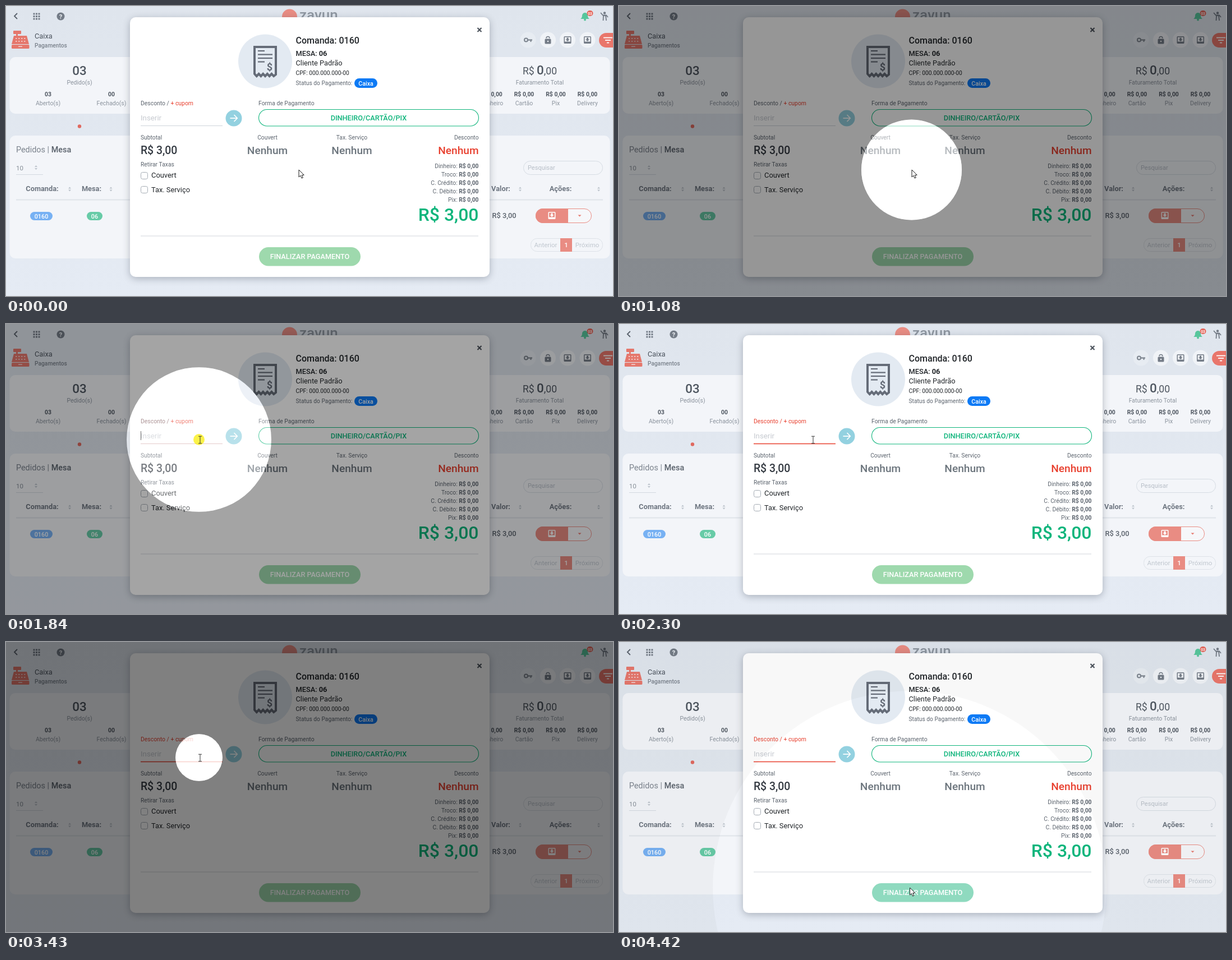
Animation, 1082 px wide and 517 px high, one loop 4480 ms. Source, as an HTML page with a canvas:

```html
<!DOCTYPE html>
<html lang="pt-BR">
<head>
<meta charset="utf-8">
<title>Pagamento</title>
<style>
html, body { margin: 0; width: 100%; height: 100%; overflow: hidden; background: #e2e8f0; }
canvas { display: block; width: 1082px; height: 517px; }
</style>
</head>
<body>
<canvas id="stage"></canvas>
<script>
const W = 1082, H = 517, LOOP = 4480;
const canvas = document.getElementById('stage');
const ratio = window.devicePixelRatio || 1;
canvas.width = W * ratio;
canvas.height = H * ratio;
const ctx = canvas.getContext('2d');
ctx.scale(ratio, ratio);

const INK = '#212529', GRAY = '#5c646e', MUTED = '#6c757d', RED = '#e8402f', GREEN = '#0fb57c';
const PINK = '#e98c83', SOFT = '#8b939d', DARK = '#4f5761';
const clamp = v => Math.max(0, Math.min(1, v));
const span = (t, a, b) => clamp((t - a) / (b - a));
const ease = p => p * p * (3 - 2 * p);
const mix = (a, b, p) => a + (b - a) * p;
const blend = (a, b, p) => `rgb(${a.map((v, i) => Math.round(mix(v, b[i], p))).join(',')})`;

function text(s, x, y, size, color, weight = 400, align = 'left') {
  ctx.font = `${weight} ${size}px Roboto, sans-serif`;
  ctx.textAlign = align;
  ctx.fillStyle = color;
  ctx.fillText(s, x, y);
  return ctx.measureText(s).width;
}
const mid = (s, x, y, size, color, weight) => text(s, x, y, size, color, weight, 'center');
const right = (s, x, y, size, color, weight) => text(s, x, y, size, color, weight, 'right');

// Runs of [string, size, color, weight] set one after another.
function runs(list, x, y) {
  for (const [s, size, color, weight] of list) x += text(s, x, y, size, color, weight);
}

function box(x, y, w, h, r, fill, stroke, lw = 1) {
  ctx.beginPath();
  ctx.roundRect(x, y, w, h, r);
  if (fill) { ctx.fillStyle = fill; ctx.fill(); }
  if (stroke) { ctx.strokeStyle = stroke; ctx.lineWidth = lw; ctx.stroke(); }
}

function disc(x, y, r, fill) {
  ctx.beginPath();
  ctx.arc(x, y, r, 0, Math.PI * 2);
  ctx.fillStyle = fill;
  ctx.fill();
}

function trace(points) {
  ctx.beginPath();
  for (let i = 0; i < points.length; i += 2) ctx.lineTo(points[i], points[i + 1]);
}

function line(points, color, lw = 1) {
  trace(points);
  ctx.strokeStyle = color;
  ctx.lineWidth = lw;
  ctx.stroke();
}

function shape(points, color) {
  trace(points);
  ctx.closePath();
  ctx.fillStyle = color;
  ctx.fill();
}

function sorter(x, y) {
  shape([x - 2.5, y - 1, x, y - 4, x + 2.5, y - 1], '#bcc3cb');
  shape([x - 2.5, y + 1, x, y + 4, x + 2.5, y + 1], '#bcc3cb');
}

function inbox(x, y, color, paper) {
  box(x - 6.5, y - 6.5, 13, 13, 1.5, color);
  box(x - 5, y - 5, 10, 8, 0, paper);
  shape([x - 1.5, y - 4, x + 1.5, y - 4, x + 1.5, y - 1, x + 3.5, y - 1, x, y + 2.5, x - 3.5, y - 1, x - 1.5, y - 1], color);
}

function header() {
  line([20, 13, 15, 18, 20, 23], '#59616c', 1.8);
  for (let i = 0; i < 9; i++) box(48.5 + (i % 3) * 4.5, 12.5 + Math.floor(i / 3) * 4.5, 3, 3, 0.3, '#747c87');
  disc(97.5, 18.5, 7, '#747c87');
  mid('?', 97.5, 22.5, 11, '#edf1f5', 700);

  disc(505.5, 19, 13.5, PINK);
  text('zavun', 523, 25, 26, '#8f97a1', 500);

  ctx.beginPath();
  ctx.moveTo(1024, 23);
  ctx.quadraticCurveTo(1027, 21, 1027, 17);
  ctx.arc(1032, 17, 5, Math.PI, 0);
  ctx.quadraticCurveTo(1037, 21, 1040, 23);
  ctx.fillStyle = '#57c69c';
  ctx.fill();
  disc(1032, 24.5, 2, '#57c69c');
  box(1035.5, 8, 11, 10, 5, '#e5675c');
  mid('03', 1041, 15.5, 6.5, '#fff', 700);

  disc(1067, 12.5, 2.2, '#747c87');
  line([1060, 12, 1064, 16.5, 1070, 16.5, 1073, 20], '#747c87', 1.8);
  line([1064.5, 26, 1065, 17, 1069, 17, 1070, 26], '#747c87', 1.8);

  const reg = '#e5776c';
  box(13, 44, 14, 6, 1, reg);
  box(18, 49, 3, 5, 0, reg);
  shape([14, 53, 37, 53, 41, 68, 10, 68], reg);
  box(10, 69, 31.5, 7, 1.5, reg);
  for (let i = 0; i < 8; i++) box(17 + (i % 4) * 5, 57 + Math.floor(i / 4) * 5, 2.5, 1.8, 0.5, '#f3d5d3');
  box(22, 71.5, 7, 1.6, 0.5, '#f3d5d3');
  text('Caixa', 51, 58, 12.8, '#4a525c');
  text('Pagamentos', 51, 74, 10.24, '#7a828c', 500);

  disc(930.5, 60.5, 14, '#e7ecf2');
  for (const x of [966, 1001, 1036.5]) disc(x, 60.5, 14, '#f0f3f7');
  ctx.beginPath();
  ctx.arc(927, 60.5, 3, 0, Math.PI * 2);
  ctx.strokeStyle = '#7d858f';
  ctx.lineWidth = 2;
  ctx.stroke();
  line([930, 60.5, 938, 60.5], '#7d858f', 2.2);
  line([935.5, 60.5, 935.5, 64], '#7d858f', 2);
  box(960.5, 58.5, 11, 9, 1.5, '#747c87');
  ctx.beginPath();
  ctx.arc(966, 57.5, 3, Math.PI, 0);
  ctx.lineWidth = 1.6;
  ctx.strokeStyle = '#747c87';
  ctx.stroke();
  disc(966, 63, 1.3, '#f0f3f7');
  inbox(1001, 60.5, '#747c87', '#f0f3f7');
  inbox(1036.5, 60.5, '#747c87', '#f0f3f7');
  box(1057, 48, 50, 26, 13, '#e9766b');
  line([1065, 56.5, 1081, 56.5], '#fff', 1.8);
  line([1068, 61, 1078, 61], '#fff', 1.8);
  line([1071, 65.5, 1075, 65.5], '#fff', 1.8);
}

function summary() {
  box(6.5, 91, 1070, 101, 10, '#f3f5f9');
  mid('03', 131, 123, 22.4, DARK, 500);
  mid('Pedido(s)', 131, 140, 10.5, SOFT);
  runs([['R$ ', 17.6, DARK], ['0', 22.4, DARK, 500], [',00', 17.6, DARK]], 921, 122);
  mid('Faturamento Total', 951.5, 140, 10.5, SOFT);
  const cells = [
    ['03', 'Aberto(s)', 75], ['00', 'Fechado(s)', 188], ['R$ 0,00', 'Dinheiro', 867],
    ['R$ 0,00', 'Cartão', 923.5], ['R$ 0,00', 'Pix', 980], ['R$ 0,00', 'Delivery', 1036.5]
  ];
  for (const [value, label, x] of cells) {
    mid(value, x, 161, 10.4, DARK, 700);
    mid(label, x, 176.5, 10.5, SOFT);
  }
  disc(131, 214.5, 3.2, '#e0695f');
}

function orders() {
  box(6.5, 231, 1070, 219, 10, '#f3f5f9');
  runs([['Pedidos | ', 14.4, '#7b838d'], ['Mesa', 14.4, '#59616b', 500]], 18, 261);
  text('10', 18, 292.5, 11.5, '#868e98');
  sorter(53.5, 288);
  line([18, 300.5, 66, 300.5], '#d3d9e0');
  box(922.5, 276.5, 141, 24, 12, null, '#d6dce3');
  text('Pesquisar', 930, 292, 11, '#b7bec7');

  for (const [s, x] of [['Comanda:', 64.5], ['Mesa:', 152.5], ['Valor:', 882], ['Ações:', 988.5]])
    mid(s, x, 330, 12.8, '#6e7681', 700);
  for (const x of [113.5, 187, 916.5, 1056.5]) sorter(x, 326.5);
  line([18, 345.5, 1064, 345.5], '#dfe4ea', 2);

  box(43, 367, 40, 15, 7.5, '#77b1f3');
  mid('0160', 63, 378.5, 10.8, '#fff', 500);
  box(144, 367, 28, 15, 7.5, '#67cba7');
  mid('06', 158, 378.5, 10.8, '#fff', 500);
  mid('R$ 3,00', 888, 378, 12.8, '#59616b', 500);
  box(944.5, 361.5, 99, 25, 12.5, '#f6f7fa', PINK);
  box(944, 361, 58, 26, [13, 0, 0, 13], PINK);
  inbox(973, 373.5, '#fff', PINK);
  shape([1019.5, 372.5, 1025.5, 372.5, 1022.5, 375.5], '#e5776c');

  box(935.5, 414.5, 128, 23, 11, null, '#dde2e8');
  mid('Anterior', 962, 430, 11.5, '#c0c7cf');
  box(988, 414, 21, 24, 0, PINK);
  mid('1', 998.5, 430, 11.5, '#fff', 500);
  mid('Próximo', 1036, 430, 11.5, '#c0c7cf');
}

function receipt() {
  disc(462, 98.5, 48, '#e3eaf2');
  const edge = [443, 122, 443, 73, 481, 73, 481, 122];
  for (let i = 1; i < 11; i++) edge.push(481 - i * 3.8, i % 2 ? 125 : 121);
  edge.push(443, 122);
  line(edge, '#656c78', 4);
  line([449, 80, 461, 80], '#656c78', 2.2);
  for (const y of [86.5, 93]) line([449, y, 475, y], '#656c78', 2.2);
  line([449, 99.5, 461, 99.5], '#656c78', 2.2);
  mid('$', 470, 114.5, 18, '#656c78', 700);
}

function modal(t) {
  const focus = span(t, 1780, 2020);
  const hover = span(t, 3980, 4090);
  ctx.save();
  ctx.shadowColor = 'rgba(40,50,65,.32)';
  ctx.shadowBlur = 14 * ratio;
  ctx.shadowOffsetY = 3 * ratio;
  box(221, 20, 641, 463, 10, '#fff');
  ctx.restore();

  line([840.5, 39, 847.5, 46], '#4c535c', 2.2);
  line([847.5, 39, 840.5, 46], '#4c535c', 2.2);
  receipt();
  text('Comanda: 0160', 516.5, 66.5, 16, INK, 500);
  runs([['MESA: ', 12.8, INK, 500], ['06', 12.8, INK, 700]], 516.5, 89);
  text('Cliente Padrão', 516.5, 106, 12.8, INK);
  text('CPF: 000.000.000-00', 516.5, 122.5, 10.24, INK);
  text('Status do Pagamento:', 516.5, 140.5, 10.24, GRAY);
  box(621, 129, 41, 17, 8.5, '#0d7af5');
  mid('Caixa', 641.5, 141.5, 10.6, '#fff', 500);

  const label = blend([92, 100, 110], [232, 64, 47], focus);
  runs([['Desconto / ', 10.4, label], ['+ cupom', 10.4, RED]], 240, 177);
  text('Inserir', 240, 203.5, 13.3, '#c6cad0');
  line([240, 213.5, 386, 213.5], blend([206, 212, 218], [232, 64, 47], focus), 1 + focus * 0.4);
  if (t >= 1770 && Math.floor((t - 1770) / 528) % 2 === 0) line([240.5, 191, 240.5, 207], '#222', 1);
  disc(406, 200, 14.5, '#93d1e0');
  line([399.5, 200, 412, 200], '#fff', 1.7);
  line([406.5, 194, 412.3, 200, 406.5, 206], '#fff', 1.7);

  text('Forma de Pagamento', 450, 177, 10.4, GRAY);
  box(450.5, 184.5, 392, 29.5, 14.75, '#fff', GREEN, 1.1);
  mid('DINHEIRO/CARTÃO/PIX', 646.5, 203.5, 12.7, GREEN, 500);

  text('Subtotal', 240, 238, 10.3, GRAY);
  text('R$ 3,00', 240, 263.5, 19.4, '#343a42', 500);
  mid('Couvert', 466, 238, 10.3, GRAY);
  mid('Nenhum', 466, 263.5, 19.1, MUTED, 500);
  mid('Tax. Serviço', 616.5, 238, 10.3, GRAY);
  mid('Nenhum', 616.5, 263.5, 19.1, MUTED, 500);
  right('Desconto', 842.5, 238, 10.3, GRAY);
  right('Nenhum', 842.5, 263.5, 19.1, RED, 500);

  text('Retirar Taxas', 240, 286, 10.3, GRAY);
  box(240.5, 296.5, 12, 12, 3, '#fff', '#a4abb3');
  text('Couvert', 259, 306, 12.9, INK);
  box(240.5, 321.5, 12, 12, 3, '#fff', '#a4abb3');
  text('Tax. Serviço', 259, 331.5, 12.8, INK);

  ['Dinheiro', 'Troco', 'C. Crédito', 'C. Débito', 'Pix'].forEach((name, i) => {
    const y = 288.5 + i * 15;
    right('R$ 0,00', 842.5, y, 10.3, GRAY, 700);
    const w = ctx.measureText('R$ 0,00').width;
    right(name + ': ', 842.5 - w, y, 10.3, GRAY);
  });
  right('R$ 3,00', 842.5, 382.5, 32, GREEN, 500);
  line([240, 410, 842, 410], '#e0e3e7', 1.5);
  box(451, 430, 181, 33.5, 16.75, blend([158, 217, 173], [143, 218, 191], hover));
  mid('FINALIZAR PAGAMENTO', 541.5, 451, 12.7, '#fff', 500);
}

function pointer(t) {
  const a = ease(span(t, 1470, 1744)), b = ease(span(t, 3555, 4045));
  return {
    x: mix(mix(521.5, 344, a), 518, b),
    y: mix(mix(292, 206, a), 438, b)
  };
}

// Shrinks to the pointer, follows it, then opens out.
function spotlight(t, at) {
  for (const [shut, open] of [[905, 1744], [3025, 4050]]) {
    if (t < shut || t > open + 410) continue;
    const p = span(t, shut, shut + 450), q = span(t, open, open + 410);
    const closing = t < open;
    const shade = 0.5 * (closing ? 1 - (1 - p) ** 3.5 : (1 - q) ** 1.25);
    const glow = 0.77 * (closing ? 1 - (1 - p) ** 2.2 : (1 - q) ** 3);
    const r = 40 + (closing ? 121 * (1 - p) ** 1.8 : 333 * (1 - (1 - q) ** 1.15));
    ctx.beginPath();
    ctx.rect(0, 0, W, H);
    ctx.arc(at.x, at.y, r, 0, Math.PI * 2);
    ctx.fillStyle = `rgba(0,0,0,${shade})`;
    ctx.fill('evenodd');
    disc(at.x, at.y, r, `rgba(255,255,255,${glow})`);
  }
}

function clickMark(t, at) {
  for (const start of [1765, 4075])
    if (t >= start && t < start + 230) {
      const fade = 1 - span(t, start + 120, start + 230);
      disc(at.x, at.y, 10, `rgba(250,238,20,${0.78 * fade})`);
    }
}

function cursor({ x, y }) {
  const overInput = x > 240 && x < 386 && y > 185 && y < 216;
  ctx.save();
  if (overInput) {
    ctx.translate(x + 2, y + 0.5);
    line([0, -6, 0, 6], '#333', 1);
    for (const e of [-6.3, 6.3]) line([-3, e, 3, e], '#333', 1);
  } else {
    ctx.translate(x + 0.5, y);
    const arrow = [0, 0, 0, 13, 3, 10.3, 5, 15, 7.3, 14, 5.3, 9.5, 9.2, 9.3];
    shape(arrow, '#fff');
    line([...arrow, 0, 0], '#1b1b1b', 1);
  }
  ctx.restore();
}

function draw(t) {
  const bg = ctx.createLinearGradient(0, 0, 0, H);
  bg.addColorStop(0, '#dfe5ed');
  bg.addColorStop(1, '#e5ebf4');
  ctx.fillStyle = bg;
  ctx.fillRect(0, 0, W, H);
  header();
  summary();
  orders();
  modal(t);
  const at = pointer(t);
  spotlight(t, at);
  clickMark(t, at);
  cursor(at);
}

const begin = performance.now();
function tick() {
  draw((performance.now() - begin) % LOOP);
  requestAnimationFrame(tick);
}
tick();
</script>
</body>
</html>
```
